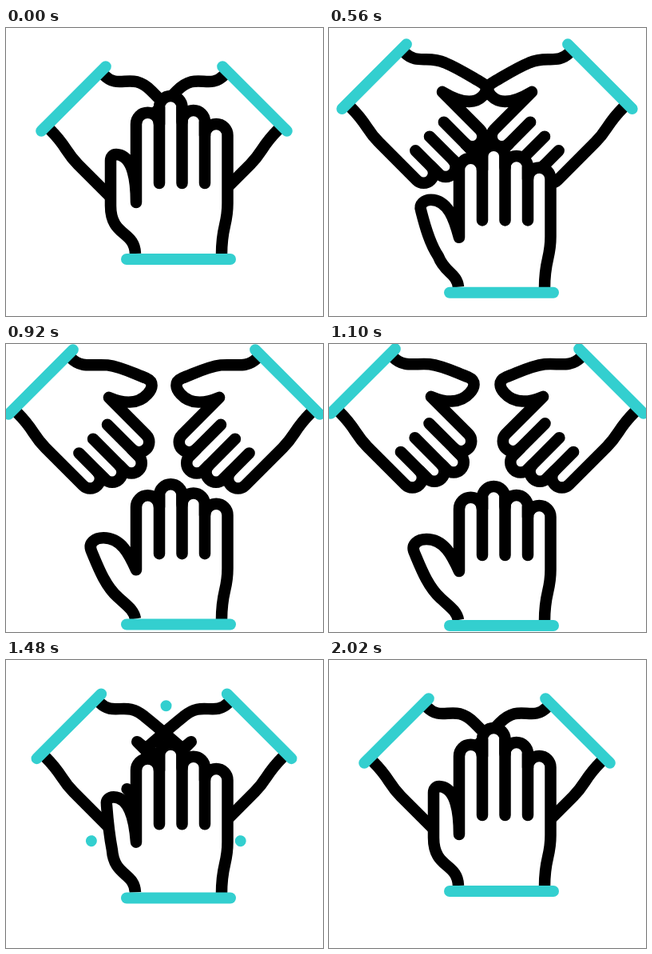
Write an HTML page that moves like this. It is 397 px wide and 360 px high and loops after 2180 ms.

```html
<!DOCTYPE html>
<html lang="en">
<head>
<meta charset="utf-8">
<title>Hands joining</title>
<style>
  html, body { margin: 0; width: 100%; height: 100%; overflow: hidden; background: #fff; }
  svg { display: block; width: 100vw; height: 100vh; }
  path { fill: none; stroke: #000; stroke-width: 14.5; stroke-linejoin: round; }
  .slots, .teal { stroke-linecap: round; }
  .teal { stroke: #33cfcf; stroke-width: 14; }
  .solid { fill: #fff; }
</style>
</head>
<body>
<svg viewBox="0 0 397 360">
  <g id="left"></g>
  <g id="right"></g>
  <g id="front"></g>
  <path id="burst" class="teal"/>
</svg>
<script>
const LOOP = 2180;
const OVERSHOOT = -0.06;
const $ = id => document.getElementById(id);
const lerp = (a, b, k) => a + (b - a) * k;
const clamp = k => Math.min(1, Math.max(0, k));
const span = (t, from, to) => clamp((t - from) / (to - from));
const smooth = k => k * k * (3 - 2 * k);

// cubic-bezier(1/3, 0, 1/3, 1)
function ease(x) {
  let lo = 0, hi = 1;
  for (let i = 0; i < 24; i++) {
    const s = (lo + hi) / 2;
    if (s * (1 - s) + s ** 3 < x) lo = s; else hi = s;
  }
  return smooth(lo);
}

// Hands are drawn upright, with the middle of the cuff at 0,0.
// lines: x of the finger edges, thumb side first; tips: centres of the finger arcs.
// Thumb curves run from the crotch round to the cuff, open and shut.
const frontHand = {
  cuff: 65, wrist: 54, bend: [42, 70],
  lines: [-53, -24, 4.5, 33, 61.5],
  tips: [145.75, 159.75, 148.75, 135.75], grow: [23, 30, 23, 19],
  slot: [88, 95], crotch: [68, 71],
  open: [-62, -88, -72, -108, -94, -108, -104, -108, -114, -102, -109, -91,
    -101, -72, -92, -48, -76, -34, -64, -23, -56, -18, -54, -7],
  shut: [-53, -95, -56, -130, -78, -131, -82, -131, -85, -128, -85, -123,
    -85, -100, -85, -85, -85, -67, -85, -28, -55, -36, -54, -7]
};
const sideHand = {
  cuff: 57, wrist: 48, bend: [38, 62],
  lines: [-46.7, -21.3, 4, 29, 54],
  tips: [140, 152, 143, 129], grow: [0, 0, 0, 0],
  slot: [96, 114], crotch: [74, 74],
  open: [-54, -92, -66, -106, -84, -105, -93, -105, -101, -100, -97, -90,
    -90, -75, -85, -58, -74, -44, -62, -30, -48, -24, -48, -6],
  shut: [-47, -95, -50, -128, -69, -129, -73, -129, -76, -126, -76, -121,
    -76, -100, -76, -85, -76, -62, -76, -26, -48, -34, -48, -6]
};

function build(id, hand, solid) {
  const group = $(id);
  const add = name => {
    const path = document.createElementNS("http://www.w3.org/2000/svg", "path");
    path.setAttribute("class", name);
    return group.appendChild(path);
  };
  const outline = add(solid ? "solid" : ""), slots = add("slots");
  add("teal").setAttribute("d", `M${-hand.cuff},0H${hand.cuff}`);

  return (spread, transform) => {
    const { lines, wrist, bend } = hand;
    const tips = hand.tips.map((v, i) => v + hand.grow[i] * (1 - spread));
    const slot = lerp(hand.slot[1], hand.slot[0], spread);
    const crotch = lerp(hand.crotch[1], hand.crotch[0], spread);
    const thumbOpen = smooth(span(spread, 0.15, 1));
    const thumb = hand.shut.map((v, i) => lerp(v, hand.open[i], thumbOpen));

    let d = `M${wrist},-6C${wrist},${-bend[0]} ${lines[4]},${-bend[0]} ${lines[4]},${-bend[1]}`;
    for (let i = 3; i >= 0; i--) {
      const r = (lines[i + 1] - lines[i]) / 2;
      d += `V${-tips[i]}A${r},${r} 0 0 0 ${lines[i]},${-tips[i]}`;
    }
    outline.setAttribute("d", `${d}V${-crotch}C${thumb.join(" ")}`);
    slots.setAttribute("d", [1, 2, 3].map(i =>
      `M${lines[i]},${-slot}V${-Math.max(tips[i - 1], tips[i])}`).join(""));
    group.setAttribute("transform", transform);
  };
}

const drawLeft = build("left", sideHand, false);
const drawRight = build("right", sideHand, false);
const drawFront = build("front", frontHand, true);

// How far apart the hands are: 0 joined, 1 apart.
function apartAt(t) {
  if (t < 1120) return ease(span(t, 100, 1090));
  if (t < 1740) return lerp(1, OVERSHOOT, ease(span(t, 1120, 1740)));
  return OVERSHOOT * (1 - smooth(span(t, 1740, 2020)));
}

// How far the thumbs and fingers are spread.
function spreadAt(t) {
  if (t < 1220) return Math.sin(span(t, 100, 1100) * Math.PI / 2);
  if (t < 1740) return lerp(1, OVERSHOOT, smooth(span(t, 1220, 1700)));
  return OVERSHOOT * (1 - smooth(span(t, 1740, 2020)));
}

function drawBurst(t) {
  const head = lerp(0.78, 1, smooth(span(t, 1480, 1620)));
  const tail = lerp(0.78, 1, smooth(span(t, 1540, 1680)));
  const at = (x, y, k) => `${200.5 + x * k},${170 + y * k}`;
  const rays = [[0, -144.5], [-120, 72], [119.5, 72]];
  const visible = t >= 1480 && t < 1700;
  $("burst").setAttribute("d", visible
    ? rays.map(([x, y]) => `M${at(x, y, tail)}L${at(x, y, head + 0.0001)}`).join("") : "");
}

function draw(t) {
  const apart = apartAt(t), spread = spreadAt(t);
  const side = `translate(${84.5 - 42 * apart},${88.5 - 42 * apart})rotate(135)`;
  drawLeft(spread, side);
  drawRight(spread, `translate(396,0)scale(-1,1)${side}`);
  drawFront(spread, `translate(216,${289 + 63 * apart})`);
  drawBurst(t);
}

const start = performance.now();
function tick() {
  draw((performance.now() - start) % LOOP);
  requestAnimationFrame(tick);
}
tick();
</script>
</body>
</html>
```
